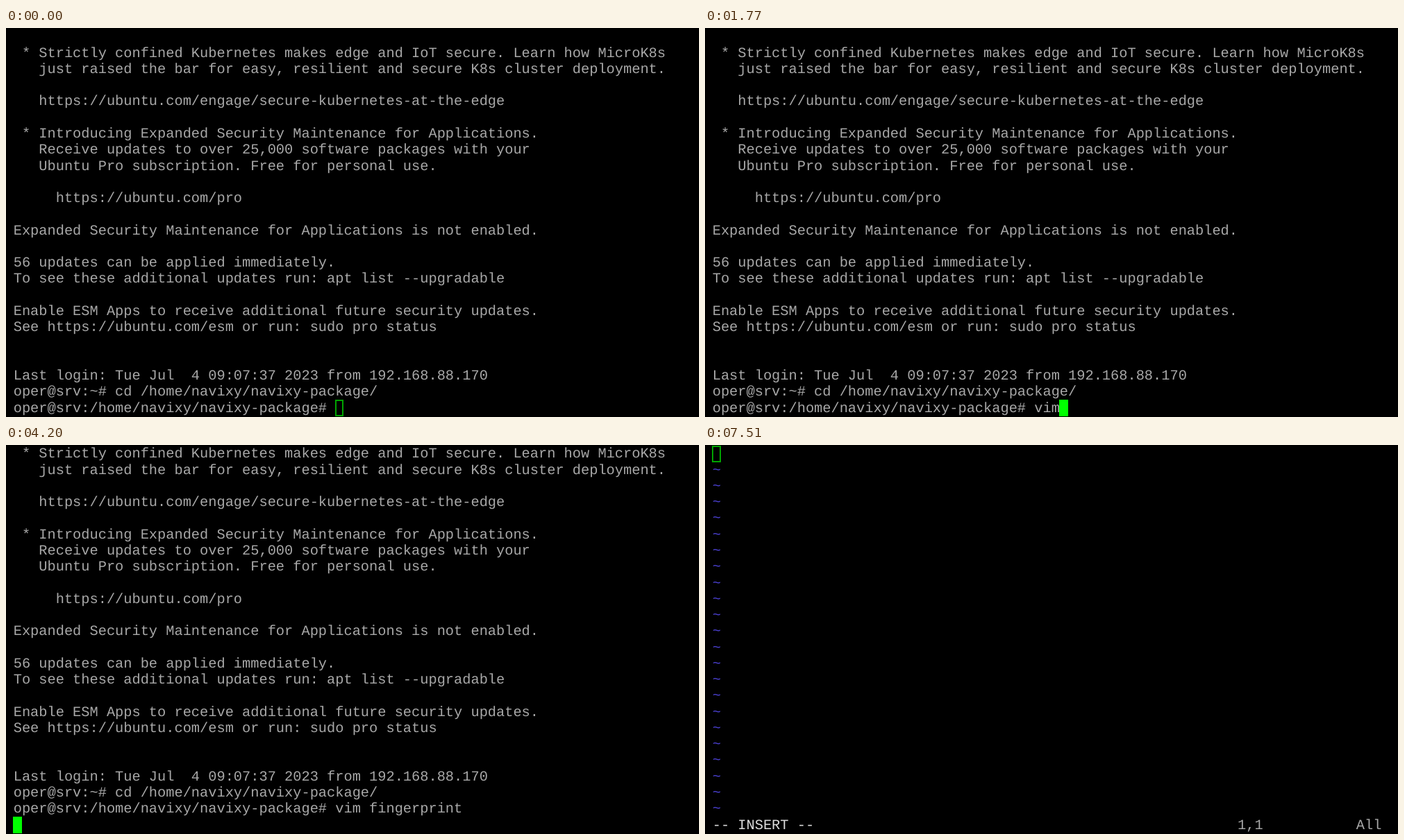
Write an HTML page that moves like this. It is 998x561 px and loops after 8 s.

```html
<!DOCTYPE html>
<html lang="en">
<head>
<meta charset="utf-8">
<title>Terminal</title>
<style>
  html, body {
    margin: 0;
    width: 100%;
    height: 100%;
    overflow: hidden;
    background: #000;
  }
  body { position: relative; }
  #screen {
    position: absolute;
    left: 10.7px;
    top: 2.4px;
    margin: 0;
    color: #a8a8a8;
    font: 20.34px/23.27px "Liberation Mono", monospace;
    font-variant-ligatures: none;
    text-rendering: geometricPrecision;
  }
  #cursor {
    position: absolute;
    box-sizing: border-box;
    width: 12.6px;
    height: 23.8px;
    background: #0f0;
  }
  #cursor.hollow {
    background: none;
    border: 2px solid #00a400;
  }
  .tilde { color: #4a40d0; }
  .mode { color: #ddd; }
  .under { color: #003000; }
</style>
</head>
<body>
<div id="cursor"></div>
<pre id="screen"></pre>
<script>
const LOOP = 8000, ROWS = 24;
const CELL = { w: 12.2, h: 23.27, left: 10.2, top: 1 };
const FOCUS = 30, ENTER = 4140, VIM = 4240, INSERT = 5340, BLUR = 7510;

const PROMPT = 'oper@srv:/home/navixy/navixy-package# ';
const COMMAND = 'vim fingerprint';
const keyTimes = [1470, 1590, 1720, 1950,
                  2470, 2600, 2740, 2860, 2970, 3080, 3270,
                  3430, 3560, 3700, 3860];
const FILE_TEXT = 'change me';
// One press, then the key repeats while held.
const deleteTimes = [5840, ...Array.from({ length: 8 }, (_, i) => 6110 + i * 33)];

const history = `
 * Strictly confined Kubernetes makes edge and IoT secure. Learn how MicroK8s
   just raised the bar for easy, resilient and secure K8s cluster deployment.

   https://ubuntu.com/engage/secure-kubernetes-at-the-edge

 * Introducing Expanded Security Maintenance for Applications.
   Receive updates to over 25,000 software packages with your
   Ubuntu Pro subscription. Free for personal use.

     https://ubuntu.com/pro

Expanded Security Maintenance for Applications is not enabled.

56 updates can be applied immediately.
To see these additional updates run: apt list --upgradable

Enable ESM Apps to receive additional future security updates.
See https://ubuntu.com/esm or run: sudo pro status


Last login: Tue Jul  4 09:07:37 2023 from 192.168.88.170
oper@srv:~# cd /home/navixy/navixy-package/`.split('\n');

const screenEl = document.getElementById('screen');
const cursorEl = document.getElementById('cursor');
const passed = (times, t) => times.filter(time => time <= t).length;
const span = (name, text) => `<span class="${name}">${text}</span>`;

function shell(t) {
  const input = PROMPT + COMMAND.slice(0, passed(keyTimes, t));
  const lines = [...history, input];
  const entered = t >= ENTER;
  if (entered) lines.push('');
  return {
    lines: lines.slice(-ROWS),
    col: entered ? 0 : input.length,
    row: ROWS - 1,
    hollow: t < FOCUS
  };
}

function vim(t) {
  const text = FILE_TEXT.slice(passed(deleteTimes, t));
  const inserting = t >= INSERT;
  const status = inserting ? '-- INSERT --' : '"fingerprint" [noeol] 1L, 9B';
  const ruler = ' '.repeat(62 - status.length) + '1,1' + ' '.repeat(11) + 'All';
  return {
    lines: [
      text && span('under', text[0]) + text.slice(1),
      ...Array(ROWS - 2).fill(span('tilde', '~')),
      (inserting ? span('mode', status) : status) + ruler
    ],
    col: 0,
    row: 0,
    hollow: t >= BLUR
  };
}

let shown = '';
function draw() {
  const t = performance.now() % LOOP;
  const view = t < VIM ? shell(t) : vim(t);
  const html = view.lines.join('\n');
  if (html !== shown) screenEl.innerHTML = shown = html;
  cursorEl.style.left = CELL.left + view.col * CELL.w + 'px';
  cursorEl.style.top = CELL.top + view.row * CELL.h + 'px';
  cursorEl.classList.toggle('hollow', view.hollow);
  requestAnimationFrame(draw);
}
draw();
</script>
</body>
</html>
```
